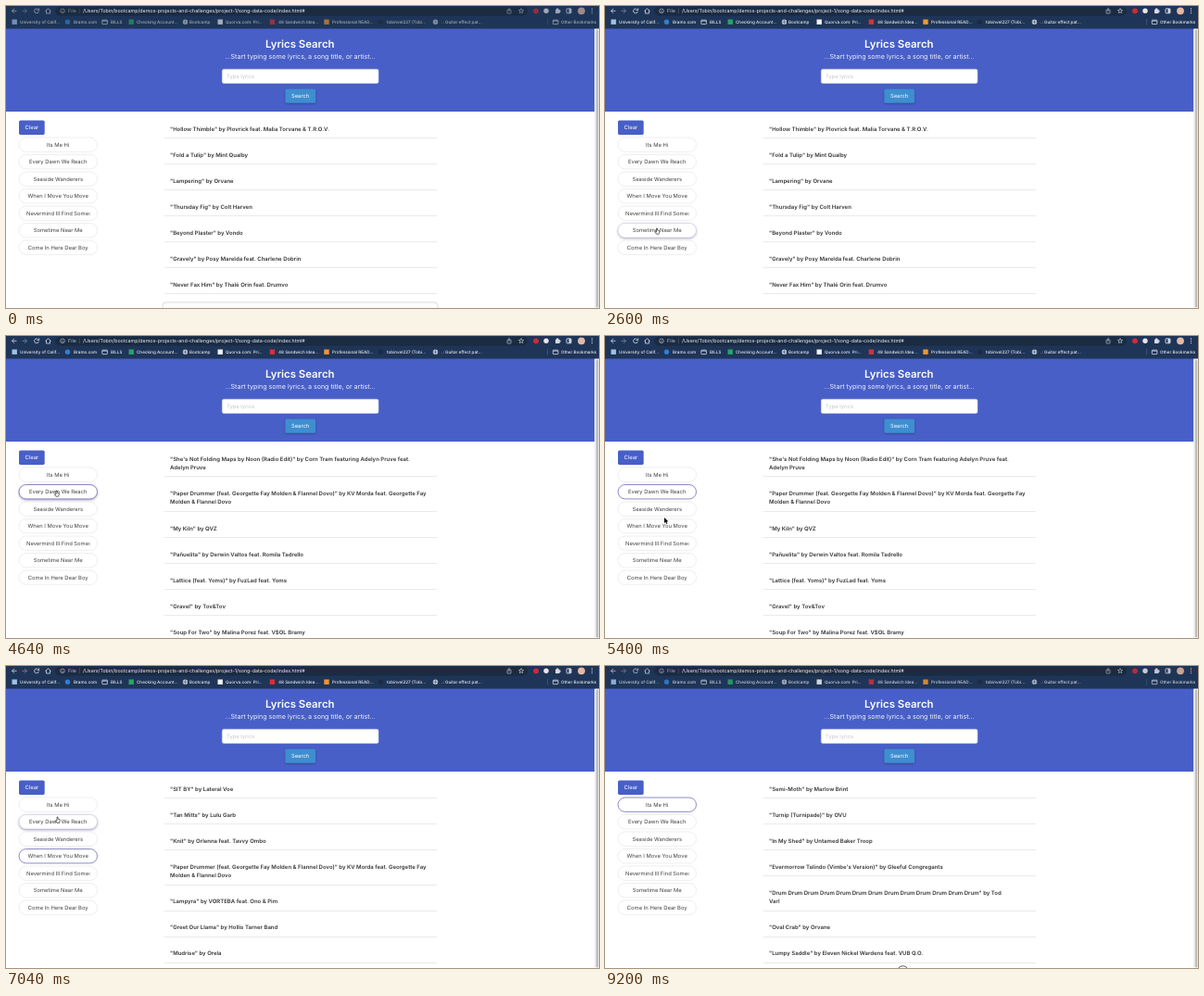
Animation, 640 px wide and 326 px high, one loop 9240 ms. Source, as an HTML page with a canvas:

```html
<!DOCTYPE html>
<html lang="en">
<head>
<meta charset="utf-8">
<title>Lyrics Search</title>
<style>
  html, body { margin: 0; width: 100%; height: 100%; overflow: hidden; background: #fff; }
  canvas { display: block; width: 640px; height: 326px; }
</style>
</head>
<body>
<canvas id="stage"></canvas>
<script>
const W = 640, H = 326, LOOP = 9240;
const canvas = document.getElementById('stage');
const ctx = canvas.getContext('2d');
const ratio = window.devicePixelRatio || 1;
canvas.width = W * ratio;
canvas.height = H * ratio;

const PILLS = ['Its Me Hi', 'Every Dawn We Reach', 'Seaside Wanderers', 'When I Move You Move',
  'Nevermind Ill Find Someone', 'Sometime Near Me', 'Come In Here Dear Boy'];

// "~" marks a line wrap.
const RESULTS = [
  ['"Hollow Thimble" by Plovrick feat. Malia Torvane & T.R.O.V.',
   '"Fold a Tulip" by Mint Qualby',
   '"Lampering" by Orvane',
   '"Thursday Fig" by Colt Harven',
   '"Beyond Plaster" by Vondo',
   '"Gravely" by Posy Marelda feat. Charlene Dobrin',
   '"Never Fax Him" by Thalé Orin feat. Drumvo'],
  ['"She\'s Not Folding Maps by Noon (Radio Edit)" by Corn Tram featuring Adelyn Pruve feat.~Adelyn Pruve',
   '"Paper Drummer (feat. Georgette Fay Molden & Flannel Dovo)" by KV Morda feat. Georgette Fay~Molden & Flannel Dovo',
   '"My Kiln" by QVZ',
   '"Pañuelita" by Derwin Valtos feat. Romila Tadrello',
   '"Lattice (feat. Yoms)" by FuzLad feat. Yoms',
   '"Gravel" by Tov&Tov',
   '"Soup For Two" by Malina Porez feat. V$OL Bramy'],
  ['"SIT BY" by Lateral Voe',
   '"Tan Mitts" by Lulu Garb',
   '"Knit" by Orlenna feat. Tavvy Ombo',
   '"Paper Drummer (feat. Georgette Fay Molden & Flannel Dovo)" by KV Morda feat. Georgette Fay~Molden & Flannel Dovo',
   '"Lampyra" by VORTEBA feat. Ono & Pim',
   '"Greet Our Llama" by Hollis Tarner Band',
   '"Mudrise" by Orela'],
  ['"Semi-Moth" by Marlow Brint',
   '"Turnip (Turnipade)" by OVU',
   '"In My Shed" by Untamed Baker Troop',
   '"Evermorrow Talindo (Vimbe\'s Version)" by Gleeful Congregants',
   '"' + Array(13).fill('Drum').join(' ') + '" by Tod~Varl',
   '"Oval Crab" by Orvane',
   '"Lumpy Saddle" by Eleven Nickel Wardens feat. VUB Q.O.']
];

// Clicks: time, result set, focused pill.
const CLICKS = [[0, 0, -1], [4160, 1, 1], [6240, 2, 3], [7480, 3, 0]];

// Pointer path: time, x, y.
const PATH = [
  [160, 321, 334], [640, 215, 190], [1160, 45, 24], [1320, 37, 6], [1500, 37, 6],
  [1680, 28, 130], [1840, 28, 130], [2360, 52, 256], [2600, 56, 240], [3000, 54.5, 167],
  [4720, 54.5, 167], [5000, 66, 184], [5240, 64, 196], [5560, 64, 196], [5700, 61, 203],
  [6440, 61, 203], [6800, 55.5, 163], [7060, 55.5, 163], [7300, 54, 148],
  [7760, 55, 149], [8200, 198, 186], [8800, 321, 334]
];

function text(s, x, y, size, color, weight = 400, align = 'left') {
  ctx.font = `${weight} ${size}px Inter, "Open Sans", sans-serif`;
  ctx.textRendering = 'geometricPrecision';
  ctx.textAlign = align;
  ctx.textBaseline = 'middle';
  ctx.fillStyle = color;
  ctx.fillText(s, x, y);
}

function rect(x, y, w, h, color) {
  ctx.fillStyle = color;
  ctx.fillRect(x, y, w, h);
}

function roundRect(x, y, w, h, r, fill, stroke, width = 0.7) {
  ctx.beginPath();
  ctx.roundRect(x, y, w, h, r);
  if (fill) { ctx.fillStyle = fill; ctx.fill(); }
  if (stroke) { ctx.strokeStyle = stroke; ctx.lineWidth = width; ctx.stroke(); }
}

function disc(x, y, r, color) {
  ctx.beginPath();
  ctx.arc(x, y, r, 0, 7);
  ctx.fillStyle = color;
  ctx.fill();
}

function line(points, color, width = 0.8) {
  ctx.beginPath();
  points.forEach(([x, y]) => ctx.lineTo(x, y));
  ctx.strokeStyle = color;
  ctx.lineWidth = width;
  ctx.stroke();
}

function shadow(color, blur, dy) {
  ctx.shadowColor = color;
  ctx.shadowBlur = blur * ratio;
  ctx.shadowOffsetY = dy * ratio;
}

function pointer(t) {
  const i = PATH.findIndex(p => p[0] > t);
  if (i === 0) return PATH[0].slice(1);
  if (i < 0) return PATH[PATH.length - 1].slice(1);
  const [t0, x0, y0] = PATH[i - 1], [t1, x1, y1] = PATH[i];
  const u = (t - t0) / (t1 - t0), e = u * u * (3 - 2 * u);
  return [x0 + (x1 - x0) * e, y0 + (y1 - y0) * e];
}

const inside = ([px, py], x, y, w, h) => px >= x && px <= x + w && py >= y && py <= y + h;
const pillTop = i => 142 + i * 18.5;

// Averages the recent past, so that hover fades in and out.
function hover(t, x, y, w, h) {
  let n = 0;
  for (let k = 0; k < 6; k++) n += inside(pointer(t - k * 30), x, y, w, h);
  return n / 6;
}

function globe(x, y) {
  disc(x, y, 2.7, '#c4ccd8');
  line([[x - 2.5, y], [x + 2.5, y]], '#2a3c58', 0.5);
  line([[x, y - 2.5], [x, y + 2.5]], '#2a3c58', 0.5);
}

function folder(x, y) {
  roundRect(x - 2.7, y - 2, 5.6, 4.4, 0.6, null, '#d4dae4', 0.8);
  line([[x - 2.7, y - 1], [x + 2.8, y - 1]], '#d4dae4', 0.7);
}

function drawBrowser(dim) {
  rect(0, 0, W, 24.5, '#1f3557');
  roundRect(53, 0.5, 510, 10, 5, '#1a2b42');
  ctx.globalAlpha = dim;

  const ink = '#d5dbe6';
  line([[11.5, 5.3], [6.5, 5.3]], ink);
  line([[9, 2.8], [6.5, 5.3], [9, 7.8]], ink);
  line([[17.5, 5.3], [22.5, 5.3]], '#7f8ba0');
  line([[20, 2.8], [22.5, 5.3], [20, 7.8]], '#7f8ba0');
  ctx.beginPath();
  ctx.arc(33, 5.3, 2.4, 0.2, 5.4);
  ctx.strokeStyle = ink;
  ctx.stroke();
  line([[35.7, 2.4], [35.7, 4.5], [33.6, 4.5]], ink);
  line([[42.5, 5.4], [45.5, 2.7], [48.5, 5.4]], ink);
  line([[43.5, 5], [43.5, 8], [47.5, 8], [47.5, 5]], ink);

  ctx.beginPath();
  ctx.arc(61, 5.3, 2.3, 0, 7);
  ctx.lineWidth = 0.6;
  ctx.stroke();
  line([[61, 4.9], [61, 6.7]], ink, 0.6);
  text('File', 67, 5.4, 5.3, '#b8c1d0');
  line([[79.3, 2.6], [79.3, 8.2]], '#66738a', 0.5);
  ctx.globalAlpha = 1;
  text('/Users/Tobin/bootcamp/demos-projects-and-challenges/project-1/song-data-code/index.html#', 83, 5.4, 5.3, '#eef1f6');
  ctx.globalAlpha = dim;

  roundRect(541, 4, 4, 4, 0.5, null, ink, 0.6);
  line([[543, 6], [543, 1.8]], ink, 0.6);
  ctx.beginPath();
  for (let i = 0; i < 10; i++) {
    const a = i * Math.PI / 5 - Math.PI / 2, r = i % 2 ? 1.2 : 2.8;
    ctx.lineTo(556 + r * Math.cos(a), 5.3 + r * Math.sin(a));
  }
  ctx.closePath();
  ctx.stroke();
  disc(572, 5.3, 2.9, '#d02b34');
  disc(583, 5.3, 2.7, '#ece4e8');
  roundRect(593, 3.5, 4.5, 4.5, 0.6, ink);
  disc(595.2, 3.3, 1.1, ink);
  disc(597.6, 5.7, 1.1, ink);
  roundRect(605, 2.8, 5, 5, 0.7, null, ink, 0.9);
  rect(607.5, 3, 2.3, 4.6, ink);
  disc(621, 5.3, 3.9, '#e3b9a5');
  for (const y of [3, 5.3, 7.6]) disc(632.5, y, 0.65, ink);

  const y = 17.2;
  const mark = (s, x) => text(s, x, y, 4.6, '#e8ecf3', 500);
  rect(6.5, y - 2.7, 5.4, 5.4, '#9fc1e8');
  mark('University of Calif...', 15);
  disc(66.5, y, 2.7, '#2e7fd6');
  mark('Bramo.com', 73);
  folder(106.5, y);
  mark('BILLS', 113);
  rect(132.5, y - 2.7, 5.4, 5.4, '#27a567');
  mark('Checking Account...', 141);
  globe(193.5, y);
  mark('Bootcamp', 198);
  rect(228.5, y - 2.7, 5.4, 5.4, '#f0f0f0');
  mark('Quorva.com: Pri...', 237);
  rect(284.7, y - 2.7, 5.4, 5.4, '#d5303c');
  mark('48 Sandwich Idea...', 294);
  rect(343.3, y - 2.7, 5.4, 5.4, '#f0962e');
  mark('Professional READ...', 352);
  disc(404.5, y, 2.7, '#1b2b46');
  mark('tobinvel227 (Tobi...', 411);
  globe(463.5, y);
  mark('.: Guitar effect pat...', 470);
  line([[584.5, 14], [584.5, 20.5]], '#5a6b88', 0.5);
  folder(593, y);
  mark('Other Bookmarks', 599);
  ctx.globalAlpha = 1;
}

function drawHeader() {
  rect(0, 24, 635.5, 90, '#485fc7');
  text('Lyrics Search', 317.3, 41.6, 11.4, '#fff', 600, 'center');
  text('...Start typing some lyrics, a song title, or artist...', 317.5, 54.6, 7.1, '#f1f3fb', 400, 'center');
  roundRect(233.3, 68.2, 168.7, 15.3, 1.8, '#fff', '#d5d8e4', 0.5);
  text('Type lyrics', 238, 76, 5.85, '#c6c6c8');
  shadow('rgba(10,20,60,.4)', 2, 0.6);
  roundRect(301.3, 89.6, 32.8, 15.2, 1.6, '#3e8ed0');
  shadow('transparent', 0, 0);
  text('Search', 317.6, 97.4, 5.85, '#fff', 400, 'center');

  rect(635.5, 24.5, 4.5, H, '#fafafa');
  rect(635.5, 24.5, 0.5, H, '#e4e4e4');
  roundRect(636.7, 25.5, 2.7, 300, 1.3, '#bdbdbd');
}

function drawSidebar(t, focus) {
  roundRect(14, 123.6, 27.7, 15.3, 1.6, '#485fc7');
  text('Clear', 27.8, 131.4, 5.9, '#fff', 400, 'center');

  PILLS.forEach((label, i) => {
    const y = pillTop(i), glow = hover(t, 14, y, 84.5, 15.4), focused = i === focus;
    if (glow > 0) shadow(`rgba(90,75,135,${0.6 * glow})`, 3, 1.1);
    roundRect(14, y, 84.5, 15.4, 7.7, '#fff');
    shadow('transparent', 0, 0);
    const edge = focused ? '#7f7dbd' : glow > 0.5 ? '#cfc9dc' : '#e2e2e2';
    roundRect(14, y, 84.5, 15.4, 7.7, null, edge, focused ? 0.9 : 0.6);
    if (i === 4) {
      ctx.save();
      ctx.beginPath();
      ctx.rect(21, y, 69.7, 16);
      ctx.clip();
      text(label, 22, y + 7.9, 5.85, '#404040');
      ctx.restore();
    } else {
      text(label, 56.2, y + 7.9, 5.85, '#404040', 400, 'center');
    }
  });
}

function drawResults(items) {
  let y = 133;
  for (const item of items) {
    item.split('~').forEach((row, i) => {
      if (i) y += 9.3;
      text(row, 177, y, 6, '#363636', 600);
    });
    rect(171, Math.round(y + 9.1), 294, 1, '#eaeaea');
    y += 28.06;
  }
}

function drawArrow(x, y) {
  ctx.beginPath();
  [[0, 0], [0, 6], [1.4, 4.8], [2.4, 7], [3.4, 6.5], [2.4, 4.4], [4.3, 4.3]]
    .forEach(([dx, dy]) => ctx.lineTo(x + dx, y + dy));
  ctx.closePath();
  ctx.strokeStyle = '#fff';
  ctx.lineWidth = 1;
  ctx.stroke();
  ctx.fillStyle = '#000';
  ctx.fill();
}

function drawHand(x, y) {
  ctx.beginPath();
  [[-0.5, 0], [0.5, 0], [0.6, 2.1], [2.6, 2.6], [2.8, 4.1], [2, 6.2], [-0.6, 6.2], [-2.1, 3.9], [-1.5, 3.4], [-0.5, 4.1]]
    .forEach(([dx, dy]) => ctx.lineTo(x + dx, y + dy));
  ctx.closePath();
  ctx.lineJoin = 'round';
  ctx.fillStyle = '#fff';
  ctx.fill();
  ctx.strokeStyle = '#333';
  ctx.lineWidth = 0.7;
  ctx.stroke();
  ctx.lineJoin = 'miter';
}

function drawPointer(t) {
  const p = pointer(t);
  const onPill = PILLS.some((_, i) => inside(p, 14, pillTop(i), 84.5, 15.4));
  const onButton = inside(p, 14, 123.6, 27.7, 15.3) || inside(p, 301, 89.6, 33, 15.2);
  const onList = inside(p, 171, 124, 294, 196);
  (onPill || onButton || onList ? drawHand : drawArrow)(...p);
}

function draw(t) {
  ctx.setTransform(ratio, 0, 0, ratio, 0, 0);
  rect(0, 0, W, H, '#fff');
  const [, set, focus] = CLICKS.filter(c => c[0] <= t).pop();
  drawHeader();
  drawBrowser(t < 160 ? 0.65 : t >= 9200 ? 0.85 : 1);
  drawSidebar(t, focus);
  drawResults(RESULTS[set]);
  if (t < 160) roundRect(169, 319.8, 297, 20, 4, '#fcfcfc', '#d4d4d4', 0.8);
  if (t >= 9200) {
    ctx.beginPath();
    ctx.arc(321.5, 330, 6.2, 0, 7);
    ctx.strokeStyle = '#444';
    ctx.lineWidth = 0.9;
    ctx.stroke();
  }
  drawPointer(t);
}

const start = performance.now();
function tick() {
  draw((performance.now() - start) % LOOP);
  requestAnimationFrame(tick);
}
tick();
</script>
</body>
</html>
```
